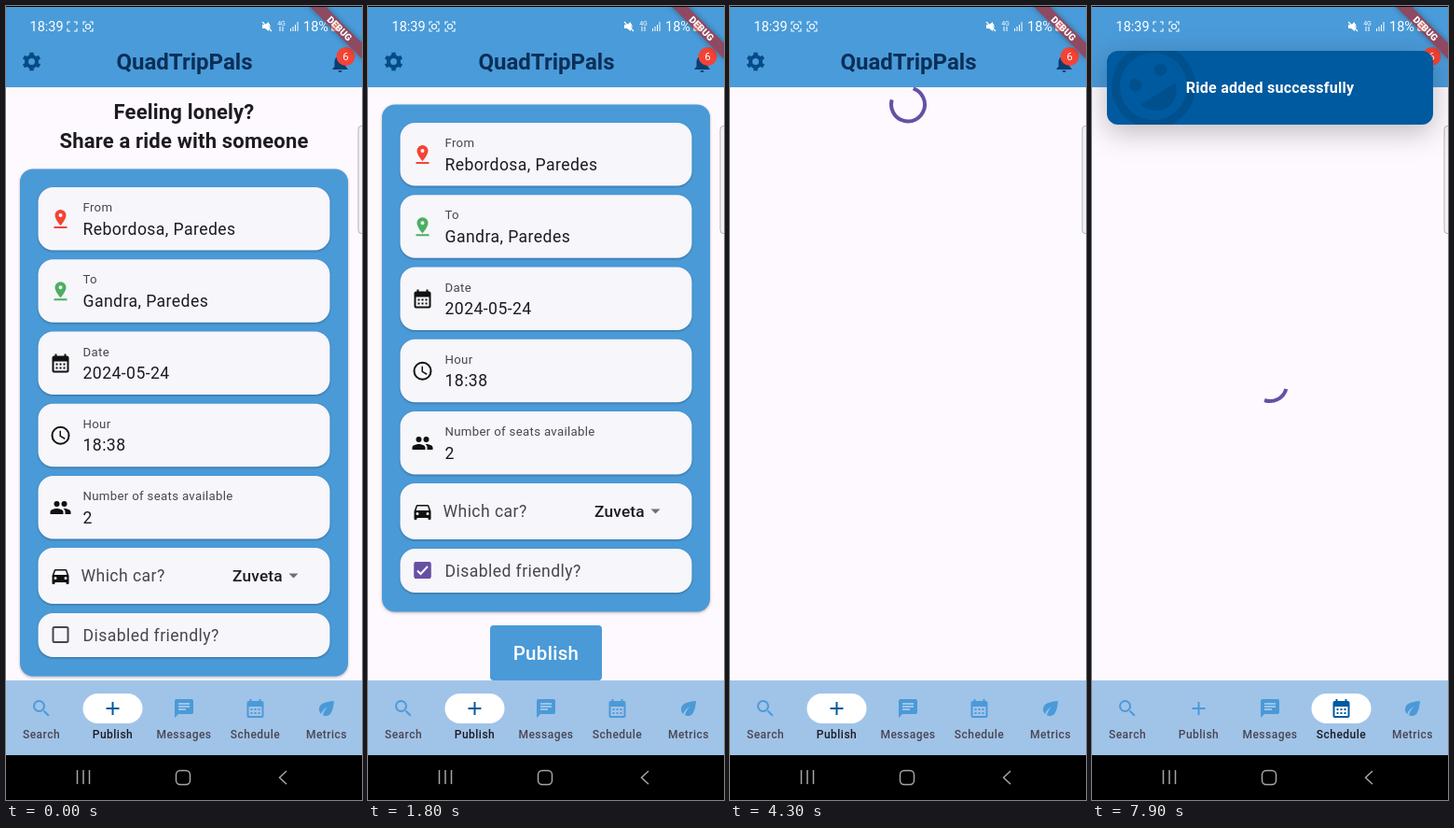
These frames come from a looping animation (382 px wide and 850 px high, 8000 ms). An HTML page:

```html
<!DOCTYPE html>
<html lang="en">
<head>
<meta charset="utf-8">
<title>Ride publishing</title>
<style>
  html, body { margin: 0; width: 100%; height: 100%; overflow: hidden; background: #000; }
  svg { display: block; width: 382px; height: 850px; font-family: Roboto, sans-serif; }
  .mid { text-anchor: middle; }
  .heading { font-size: 22px; font-weight: 700; letter-spacing: .19px; fill: #1d1b20; }
  .label { font-size: 13.2px; letter-spacing: .33px; fill: #49454f; }
  .value { font-size: 17.6px; letter-spacing: .43px; fill: #1d1b20; }
  .tab text { font-size: 12px; font-weight: 500; letter-spacing: .47px; fill: #49454f; }
  .tab .icon { color: #4a9ad8; }
  .tab.on text { fill: #1d1b20; }
  .tab.on .icon { color: #005a9f; }
  .line { fill: none; stroke: currentColor; stroke-width: 2; }
  .icon { fill: currentColor; fill-rule: evenodd; }
  .field { fill: #f6f6fb; filter: drop-shadow(0 1px 1px rgba(0,0,0,.3)); }
</style>
</head>
<body>
<svg viewBox="0 0 382 850">
  <defs>
    <clipPath id="page"><rect y="87" width="382" height="635"/></clipPath>
    <clipPath id="toast-box"><rect x="16" y="48" width="350" height="79" rx="12"/></clipPath>
  </defs>
  <rect width="382" height="802" fill="#fef9fe"/>

  <g clip-path="url(#page)">
    <g id="form">
      <g class="heading mid">
        <text x="191" y="121">Feeling lonely?</text>
        <text x="191" y="152">Share a ride with someone</text>
      </g>
      <rect x="15" y="174.500" width="352" height="543" rx="14" fill="#4a9ad8"
        style="filter:drop-shadow(0 1px 1.500px rgba(0,0,0,.3))"/>
      <g id="fields"></g>
      <rect x="131" y="732" width="120" height="59" rx="4" fill="#4a9ad8"/>
      <text class="mid" x="191" y="768.500" font-size="20.500" font-weight="500" letter-spacing=".3" fill="#fff">Publish</text>
    </g>
    <path id="spinner" fill="none" stroke="#6750a4" stroke-width="4"/>
  </g>
  <path d="M382 128.500h-1q-3 0-3 4v107q0 4 3 4h1" fill="#f3f1f5" stroke="#b5b3b8"/>

  <rect width="382" height="87" fill="#4a9bd9"/>
  <g id="bar"></g>
  <text class="mid" x="191.500" y="68" font-size="24" font-weight="700" fill="#0a2f57">QuadTripPals</text>
  <circle cx="364.500" cy="54" r="10" fill="#f44336"/>
  <text class="mid" x="364.500" y="58" font-size="11.500" fill="#fff">6</text>

  <g id="toast">
    <rect x="16" y="48" width="350" height="79" rx="12" fill="#005a9f"
      style="filter:drop-shadow(0 8px 15px rgba(0,0,0,.25))"/>
    <g clip-path="url(#toast-box)">
      <g transform="translate(66 86) rotate(-32) scale(4.5)" opacity=".1">
        <circle r="9" fill="none" stroke="#000" stroke-width="2"/>
        <circle cx="-3.500" cy="-2.500" r="1.500"/><circle cx="3.500" cy="-2.500" r="1.500"/>
        <path d="M0 6c2.280 0 4.220-1.660 5-4H-5c.780 2.340 2.720 4 5 4z"/>
      </g>
    </g>
    <text class="mid" x="191" y="93" font-size="16" font-weight="600" letter-spacing=".25" fill="#fff">Ride added successfully</text>
  </g>

  <g id="tabs"><rect y="722" width="382" height="80" fill="#a0c3e8"/></g>

  <g id="status" fill="#fff">
    <text x="25.500" y="27" font-size="14.500">18:39</text>
    <g fill="none" stroke="#fff" stroke-width="1.100">
      <path id="bracket" d="M66 20v-3h3M73 17h3v3M76 24v3h-3M69 27h-3v-3"/>
      <use href="#bracket" x="17"/>
      <circle id="dot" cx="71" cy="22" r="2.500"/>
      <circle cx="88" cy="22" r="2.500"/>
      <path d="M275 17l10 10M282 19q2 3 0 6"/>
    </g>
    <path d="M275 20h3l4-3v10l-4-3h-3zM305 24h1v3h-1zM307.500 22h1v5h-1zM310 20h1v7h-1zM312.500 17h1v10h-1z"/>
    <text class="mid" x="295.500" y="21" font-size="7">4G</text>
    <path d="M294 22v5M297 22v5" stroke="#fff"/>
    <text x="319" y="27" font-size="14.500">18%</text>
    <rect x="349" y="18" width="9" height="9" rx="2"/>
  </g>
  <g transform="translate(382 0) rotate(45)">
    <rect x="-40" y="28" width="80" height="12" fill="#b71c1c" opacity=".63" style="filter:drop-shadow(0 0 3px rgba(0,0,0,.5))"/>
    <text class="mid" y="37.700" font-size="10.200" font-weight="900" fill="#fff">DEBUG</text>
  </g>
  <rect width="382" height="1"/>

  <rect y="802" width="382" height="48"/>
  <g fill="none" stroke="#a5a5a5" stroke-width="1.500">
    <path d="M76.500 818v15M83 818v15M89.500 818v15M301 819l-7.500 7 7.500 7"/>
    <rect x="182.500" y="818.500" width="15" height="15" rx="4.500"/>
  </g>
</svg>
<script>
const $ = id => document.getElementById(id);
const add = (id, html) => $(id).insertAdjacentHTML('beforeend', html);

// Icon artwork on a 24 unit grid
const icons = {
  search: '<path class="line" d="M14.500 14.500l5.300 5.300"/><circle class="line" cx="9.500" cy="9.500" r="5.500"/>',
  plus: '<path class="line" d="M12 5v14M5 12h14"/>',
  chat: '<path d="M20 2H4c-1.100 0-2 .900-2 2v18l4-4h14c1.100 0 2-.900 2-2V4c0-1.100-.900-2-2-2zM6 9h12v2H6zm0 3h8v2H6zm0-6h12v2H6z"/>',
  calendar: '<path d="M19 4h-1V2h-2v2H8V2H6v2H5Q3 4 3 6v14q0 2 2 2h14q2 0 2-2V6q0-2-2-2zm0 16H5V10h14z"/>' +
    '<path class="line" d="M7 13h10M7 17h10" stroke-dasharray="2"/>',
  leaf: '<path d="M6.050 8.050c-2.730 2.730-2.730 7.150-.020 9.880 1.470-3.400 4.090-6.240 7.360-7.930-2.770 2.340-4.710 5.610-5.390 9.320 2.600 1.230 5.800.780 7.950-1.370C19.430 14.470 20 4 20 4S9.530 4.570 6.050 8.050z"/>',
  bell: '<path d="M10 20h4a2 2 0 0 1-4 0zM18 16v-5c0-3.070-1.640-5.640-4.500-6.320V4a1.500 1.500 0 0 0-3 0v.680C7.630 5.360 6 7.920 6 11v5l-2 2v1h16v-1z"/>',
  gear: '<circle class="line" cx="12" cy="12" r="5.500" style="stroke-width:4"/>' +
    [0, 60, 120].map(a => `<path class="line" style="stroke-width:4.500" transform="rotate(${a} 12 12)" d="M12 2.200v4.500M12 17.300v4.500"/>`).join(''),
  pin: '<path d="M18 8A6 6 0 0 0 6 8c0 4.500 6 11 6 11s6-6.500 6-11zm-8 0a2 2 0 0 1 4 0 2 2 0 0 1-4 0zM5 20h14v2H5z"/>',
  clock: '<circle class="line" cx="12" cy="12" r="9"/><path class="line" style="stroke-width:1.500" d="M11.750 7v5.600l4.900 2.900"/>',
  people: '<circle cx="16" cy="8" r="3"/><circle cx="8" cy="8" r="3"/>' +
    '<path d="M8 13c-2.330 0-7 1.170-7 3.500V19h14v-2.500c0-2.330-4.670-3.500-7-3.500zm8 0l-1 .050c1.200.840 2 1.970 2 3.450V19h6v-2.500c0-2.330-4.670-3.500-7-3.500z"/>',
  car: '<path d="M18.900 6q-.4-1-1.400-1h-11q-1 0-1.400 1L3 12v8q0 1 1 1h1q1 0 1-1v-1h12v1q0 1 1 1h1q1 0 1-1v-8zM5 11l1.500-4.500h11L19 11zM5 14.500a1.500 1.500 0 0 0 3 0 1.500 1.500 0 0 0-3 0zm11 0a1.500 1.500 0 0 0 3 0 1.500 1.500 0 0 0-3 0z"/>'
};
const icon = (name, x, y, color) =>
  `<g class="icon" transform="translate(${x - 12} ${y - 12})"${color ? ` color="${color}"` : ''}>${icons[name]}</g>`;

add('bar', icon('gear', 27.5, 59.5, '#044c86') + icon('bell', 358.5, 61, '#083e70'));

const box = (y, h) => `<rect class="field" x="34.500" y="${y}" width="313" height="${h}" rx="16"/>`;
[
  ['pin', 'From', 'Rebordosa, Paredes', '#f44336'],
  ['pin', 'To', 'Gandra, Paredes', '#4caf60'],
  ['calendar', 'Date', '2024-05-24'],
  ['clock', 'Hour', '18:38'],
  ['people', 'Number of seats available', '2']
].forEach(([name, label, value, color = '#111'], i) => {
  const y = 194 + i * 77.25;
  add('fields', box(y, 67.5) + icon(name, 58.5, y + 34, color) +
    `<text class="label" x="82.500" y="${y + 26}">${label}</text><text class="value" x="82.500" y="${y + 50.5}">${value}</text>`);
});
add('fields', box(580, 60) + icon('car', 58.5, 610, '#111') +
  `<text class="value" x="80.500" y="616" style="fill:#49454f">Which car?</text>
   <text x="243" y="616" font-size="17.300" font-weight="500" letter-spacing=".2" fill="#1d1b20">Zuveta</text>
   <path d="M303.500 607.500h10l-5 5z" fill="#707070"/>` +
  box(650, 47) +
  `<rect x="50.500" y="665" width="16" height="16" rx="1.500" fill="none" stroke="#49454f" stroke-width="2"/>
   <g id="check"><rect x="49.500" y="664" width="18" height="18" rx="2" fill="#6750a4"/>
   <path d="M53 673.500l3.500 3.500 7.500-8" fill="none" stroke="#fff" stroke-width="2"/></g>
   <text class="value" x="82.500" y="679.500" style="fill:#49454f">Disabled friendly?</text>`);

const tabs = [['search', 'Search'], ['plus', 'Publish'], ['chat', 'Messages'], ['calendar', 'Schedule'], ['leaf', 'Metrics']]
  .map(([name, label], i) => {
    const x = 38 + i * 76.5;
    add('tabs', `<g class="tab"><rect x="${x - 32}" y="736" width="64" height="32" rx="16" fill="#fff"/>
      ${icon(name, x, 752)}<text class="mid" x="${x}" y="784">${label}</text></g>`);
    const node = $('tabs').lastElementChild;
    return { node, x, pill: node.firstElementChild };
  });

const LOOP = 8000, CHECK = 350, SUBMIT = 2300, DONE = 4350;
const clamp = v => Math.min(1, Math.max(0, v));
const span = (t, a, b) => clamp((t - a) / (b - a));
const smooth = p => p * p * (3 - 2 * p);

// cubic-bezier(.4, 0, .2, 1)
function ease(x) {
  let lo = 0, hi = 1, s;
  for (let i = 0; i < 20; i++) {
    s = (lo + hi) / 2;
    const u = 1 - s;
    if (1.2 * u * u * s + .6 * u * s * s + s * s * s < x) lo = s; else hi = s;
  }
  return s * s * (3 - 2 * s);
}

const elastic = p => p >= 1 ? 1 : p <= 0 ? 0 : 2 ** (-10 * p) * Math.sin((p - .1) * 5 * Math.PI) + 1;

function arc(cy, age) {
  const cycle = age / 1333, p = cycle % 1;
  const head = ease(clamp(p * 2)), tail = ease(clamp(p * 2 - 1));
  const start = -90 + 270 * tail + 90 * p + 360 * age / 2222;
  const sweep = Math.max(270 * (head - tail), .1);
  const at = deg => {
    const r = deg * Math.PI / 180;
    return `${191 + 18 * Math.cos(r)} ${cy + 18 * Math.sin(r)}`;
  };
  return `M${at(start)}A18 18 0 ${sweep > 180 ? 1 : 0} 1 ${at(start + sweep)}`;
}

const show = (id, on) => $(id).style.display = on ? '' : 'none';

function draw(t) {
  const done = t >= DONE;
  show('form', t < SUBMIT);
  show('spinner', t >= SUBMIT);
  show('toast', done);
  show('dot', t >= 300 && !done);

  const scroll = 69 * smooth(span(t, 850, 1250));
  const stretch = 1 + .0129 * smooth(span(t, 1180, 1300)) * (1 - smooth(span(t, 1300, 1550)));
  $('form').setAttribute('transform', `translate(0 722) scale(1 ${stretch}) translate(0 ${-722 - scroll})`);
  $('check').setAttribute('opacity', span(t, CHECK, CHECK + 150));

  if (t >= SUBMIT) $('spinner').setAttribute('d', done ? arc(405, t - 4288) : arc(105.5, t - 2268));
  $('toast').setAttribute('transform', `translate(0 ${-127 * (1 - elastic(span(t, DONE, DONE + 1200)))})`);

  const fade = span(t, DONE, DONE + 100), grow = .4 + .6 * ease(span(t, DONE, DONE + 500));
  tabs.forEach(({ node, x, pill }, i) => {
    node.classList.toggle('on', i === (done ? 3 : 1));
    pill.setAttribute('opacity', i === 1 ? 1 - fade : i === 3 ? fade : 0);
    if (i === 3) pill.setAttribute('transform', `translate(${x} 0) scale(${grow} 1) translate(${-x} 0)`);
  });
}

const begin = performance.now();
(function frame() {
  draw((performance.now() - begin) % LOOP);
  requestAnimationFrame(frame);
})();
</script>
</body>
</html>
```
